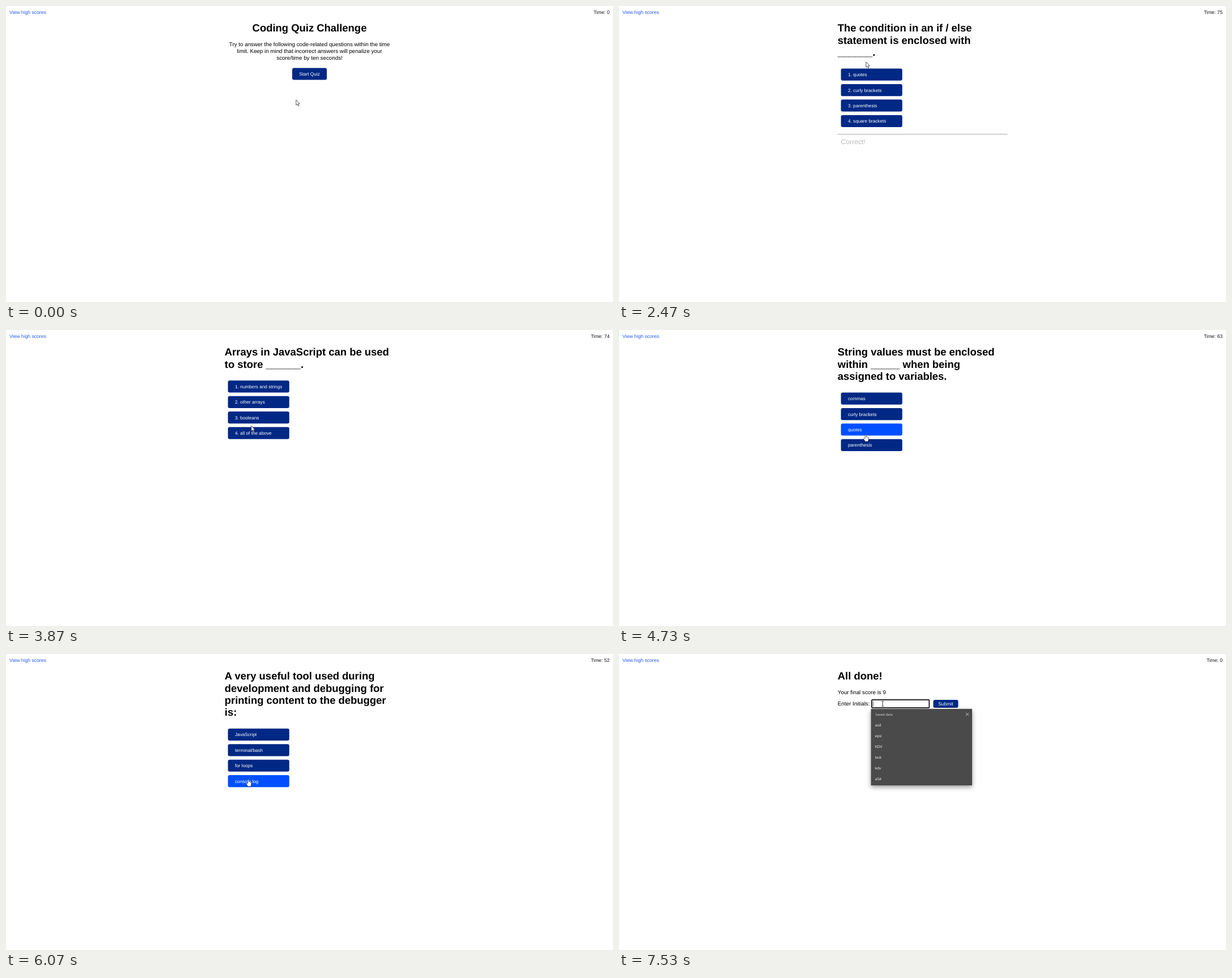
These frames come from a looping animation (1071x523 px, 8000 ms). An HTML page:

```html
<!DOCTYPE html>
<html lang="en">
<head>
<meta charset="utf-8">
<title>Coding Quiz Challenge</title>
<style>
  html, body { margin: 0; width: 100%; height: 100%; overflow: hidden; background: #fff; }
  svg { display: block; width: 100%; height: 100%; }
  text { font-family: "Liberation Sans", Arial, sans-serif; text-rendering: geometricPrecision; }
  .menu text { font-family: "Open Sans", "Noto Sans", sans-serif; }
</style>
</head>
<body>
<svg id="stage" viewBox="0 0 1071 523"></svg>
<script>
const LOOP = 8000;
const LINE = 21.27;
const NAVY = '#002884', BLUE = '#0050ff';
const stage = document.getElementById('stage');

const questions = [
  { from: 1200,
    title: ['Commonly used data types DO', 'Not Include:'],
    answers: ['1. strings', '2. booleans', '3. alerts', '4. numbers'] },
  { from: 2470,
    title: ['The condition in an if / else', 'statement is enclosed with', '______.'],
    answers: ['1. quotes', '2. curly brackets', '3. parenthesis', '4. square brackets'],
    feedback: { word: 'Correct!', fadeFrom: 2700, fadeTo: 3670 } },
  { from: 3800,
    title: ['Arrays in JavaScript can be used', 'to store ______.'],
    answers: ['1. numbers and strings', '2. other arrays', '3. booleans', '4. all of the above'] },
  { from: 4700,
    title: ['String values must be enclosed', 'within _____ when being', 'assigned to variables.'],
    answers: ['commas', 'curly brackets', 'quotes', 'parenthesis'] },
  { from: 5200,
    title: ['A very useful tool used during', 'development and debugging for', 'printing content to the debugger', 'is:'],
    answers: ['JavaScript', 'terminal/bash', 'for loops', 'console.log'],
    feedback: { word: 'Wrong!', fadeFrom: 5380, fadeTo: 6040 } },
];
const DONE = 6200, FOCUS = 7450, MENU = 7510;

// [time, value shown by the countdown]
const clock = [[0, 0], [2200, 75], [3200, 74], [4200, 73], [4700, 63], [5200, 52], [6190, 51], [7200, 0]];

// [time, x, y] of the pointer's hot spot
const path = [
  [0, 511.5, 165.5], [30, 511.5, 165.5], [270, 533, 123.5], [760, 533, 123.5], [1000, 524, 123.5],
  [1420, 524, 123.5], [1730, 466.5, 134.5], [1950, 445, 182], [2270, 435.5, 99.5], [2330, 435.5, 98.5],
  [2690, 435.5, 98.5], [3500, 433, 173], [3800, 432.5, 169], [4000, 432.5, 169], [4200, 434, 176],
  [4420, 432.5, 171], [4530, 433, 175], [4640, 433, 175], [4730, 435, 184.5], [5200, 433, 203],
  [5350, 433, 203], [6000, 427.5, 221.5], [6420, 427.5, 221.5], [7270, 461, 91], [7470, 465.3, 88],
];

const smooth = u => u * u * (3 - 2 * u);
const clamp = u => Math.max(0, Math.min(1, u));

function pointerAt(t) {
  const next = path.findIndex(p => p[0] > t);
  if (next < 0) return path[path.length - 1].slice(1);
  const [t0, x0, y0] = path[next - 1], [t1, x1, y1] = path[next];
  const u = smooth((t - t0) / (t1 - t0));
  return [x0 + (x1 - x0) * u, y0 + (y1 - y0) * u];
}

const text = (s, x, y, size, extra = '') =>
  `<text x="${x}" y="${y}" font-size="${size}" ${extra}>${s}</text>`;
const rect = (x, y, w, h, fill, extra = '') =>
  `<rect x="${x}" y="${y}" width="${w}" height="${h}" fill="${fill}" ${extra}/>`;
const heading = (s, x, line = 0, extra = '') =>
  text(s, x, 45.4 + line * LINE, 18.45, 'font-weight="bold" ' + extra);
const MIDDLE = 'text-anchor="middle"';

let pointer, cursor;

function button(x, y, w, h, label) {
  const [px, py] = pointer;
  const hover = px >= x && px <= x + w && py >= y && py <= y + h;
  if (hover) cursor = 'hand';
  return rect(x, y, w, h, hover ? BLUE : NAVY, 'rx="3"') + label;
}

function startScreen() {
  const intro = ['Try to answer the following code-related questions within the time',
    'limit. Keep in mind that incorrect answers will penalize your',
    'score/time by ten seconds!'];
  return heading('Coding Quiz Challenge', 535.5, 0, MIDDLE) +
    intro.map((s, i) => text(s, 535.5, 71 + i * 11.75, 9.8, MIDDLE)).join('') +
    button(505, 109.4, 61, 21.2, text('Start Quiz', 535.5, 122.9, 8.25, MIDDLE + ' fill="#fff"'));
}

function questionScreen({ title, answers, feedback }, t) {
  const top = 46.75 + LINE * title.length;
  let out = title.map((s, i) => heading(s, 385.8, i)).join('');
  out += answers.map((s, i) => {
    const y = top + i * 27.4;
    return button(391.6, y, 108.2, 21.2, text(s, 404, y + 13.6, 8.2, 'fill="#fff"'));
  }).join('');
  if (feedback) {
    const { word, fadeFrom, fadeTo } = feedback;
    const opacity = 1 - clamp((t - fadeFrom) / (fadeTo - fadeFrom));
    out += `<g opacity="${opacity}">` + rect(385.5, top + 115.5, 300, 1, '#aaa') +
      text(word, 391.6, top + 133.9, 12.15, 'fill="#bbb"') + '</g>';
  }
  return out;
}

function savedMenu() {
  const entries = ['asd', 'epic', 'KDV', 'test', 'kdv', 'aSA'];
  return '<g class="menu">' +
    rect(444.6, 97, 178.4, 135.2, '#4a4a4a', 'style="filter:drop-shadow(0 3px 4px #0006)"') +
    text('Saved data', 452.6, 108.8, 5.9, 'fill="#ddd"') +
    '<path d="M612 104l5 5m0-5l-5 5" stroke="#eee" stroke-width=".8"/>' +
    entries.map((s, i) => text(s, 451.8, 128.4 + i * 19, 6.5, 'fill="#fff"')).join('') + '</g>';
}

function doneScreen(t) {
  const focused = t >= FOCUS;
  const [px, py] = pointer;
  if (px > 445 && px < 548 && py > 80 && py < 96) cursor = 'beam';
  return heading('All done!', 385.8) +
    text('Your final score is 9', 385.8, 71, 9.8) +
    text('Enter Initials:', 385.8, 91, 9.8) +
    (focused
      ? rect(446, 80.8, 101.4, 14.4, '#fff', 'rx="1.5" stroke="#101010" stroke-width="1.8"') +
        rect(448.4, 83.5, 0.8, 9, '#333')
      : rect(446.5, 81.5, 100.5, 13, '#fff', 'rx="1" stroke="#767676"')) +
    button(554.5, 81, 44, 14, text('Submit', 576.4, 91, 8.5, MIDDLE + ' fill="#fff"')) +
    (t >= MENU ? savedMenu() : '');
}

const cursors = {
  arrow: '<path d="M.3 .3V9.8L2.5 7.8 4 11.2 5.5 10.5 4.1 7.2H6.8Z" fill="#fff" stroke="#223" stroke-width=".75"/>',
  hand: '<path d="M-.9 7V.9Q-.8 0 0 0T1 .9V4.2Q2.3 3.7 2.7 4.6 3.9 4.2 4.2 5.1 5.3 5 5.4 6V8.6L4.4 12.5H-.6L-3.3 8.2Q-3.7 7.1-2.6 6.8-1.8 6.5-.9 7Z" fill="#fff" stroke="#223" stroke-width=".7"/>',
  beam: '<path d="M-2-4.5H-.5L0-4 .5-4.5H2M0-4V4M-2 4.5H-.5L0 4 .5 4.5H2" fill="none" stroke="#222" stroke-width=".9"/>',
};

function render(t) {
  pointer = pointerAt(t);
  cursor = 'arrow';
  const seconds = clock.filter(c => c[0] <= t).pop()[1];
  const question = questions.filter(q => q.from <= t).pop();
  const screen = t >= DONE ? doneScreen(t) : question ? questionScreen(question, t) : startScreen();
  stage.innerHTML =
    text('View high scores', 6, 14.1, 8.6, 'fill="#2558f5"') +
    text('Time: ' + seconds, 1065, 14.1, 8.6, 'text-anchor="end" fill="#111"') +
    screen +
    `<g transform="translate(${pointer})">${cursors[cursor]}</g>`;
}

function tick() {
  render(performance.now() % LOOP);
  requestAnimationFrame(tick);
}
tick();
</script>
</body>
</html>
```
